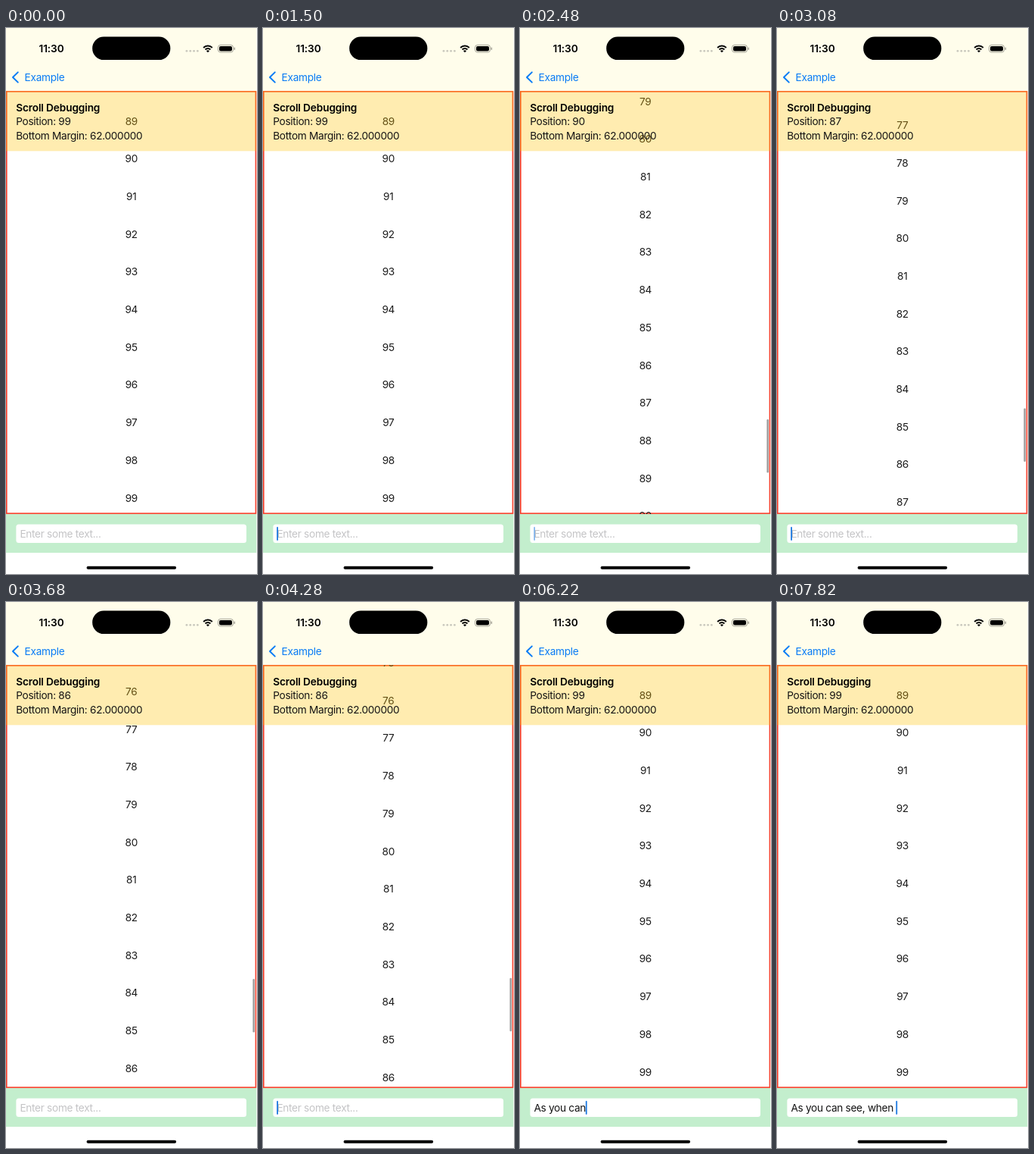
An HTML page that plays this animation: 332x720 px, repeating every 8 s.

```html
<!DOCTYPE html>
<html lang="en">
<head>
<meta charset="utf-8">
<title>Scroll debugging</title>
<style>
  html, body { margin: 0; width: 100%; height: 100%; overflow: hidden; background: #fff; }
  svg { display: block; width: 332px; height: 720px; }
  text { font: 13.7px Inter, "Open Sans", sans-serif; letter-spacing: -.32px; white-space: pre; fill: #141414; }
  .bold { font-weight: 600; letter-spacing: -.15px; fill: #000; }
  #rows text { text-anchor: middle; fill: #1c1c1c; }
</style>
</head>
<body>
<svg viewBox="0 0 332 720">
  <clipPath id="viewport"><rect y="83" width="331.2" height="558"/></clipPath>
  <rect width="331.2" height="83" fill="#fffdeb"/>

  <!-- status bar -->
  <text class="bold" x="43.6" y="32">11:30</text>
  <rect x="114.2" y="11.6" width="103.2" height="30.5" rx="15.2"/>
  <g fill="#c9c8bd">
    <circle cx="239" cy="30.3" r="1.4"/><circle cx="243.8" cy="30.3" r="1.4"/>
    <circle cx="248.6" cy="30.3" r="1.4"/><circle cx="253.4" cy="30.3" r="1.4"/>
  </g>
  <g fill="none" stroke="#000" stroke-width="2">
    <path d="M261.2 26a8.2 8.2 0 0 1 11.6 0M263.6 28.5a4.8 4.8 0 0 1 6.8 0"/>
  </g>
  <path d="M267 32.3l-2-2.1a2.9 2.9 0 0 1 4 0z"/>
  <rect x="280.5" y="22.4" width="20" height="9.6" rx="3.2" fill="none" stroke="#000" stroke-opacity=".35"/>
  <rect x="282" y="23.9" width="17" height="6.6" rx="2"/>
  <rect x="301.7" y="25.5" width="1.3" height="3.4" rx=".6" opacity=".4"/>

  <!-- navigation -->
  <path d="M15.8 58.4L9 65l6.8 6.6" fill="none" stroke="#0a7cf5" stroke-width="2" stroke-linecap="round" stroke-linejoin="round"/>
  <text x="24.6" y="70" style="fill:#0a7cf5">Example</text>

  <!-- list -->
  <rect x=".8" y="83.8" width="329.6" height="556.3" fill="none" stroke="#f8432f" stroke-width="1.65"/>
  <g clip-path="url(#viewport)">
    <g id="rows"></g>
    <rect id="indicator" x="326.4" width="2.5" height="70.5" rx="1.25" fill="#000" fill-opacity=".38"/>
  </g>
  <rect y="83" width="331.2" height="79.3" fill="#ffc300" fill-opacity=".31"/>
  <text class="bold" x="13.2" y="109.5">Scroll Debugging</text>
  <text id="position" x="13.2" y="128"></text>
  <text x="13.2" y="146.5">Bottom Margin: 62.000000</text>

  <!-- input -->
  <rect y="641" width="331.2" height="51" fill="#c3eecd"/>
  <rect x="13.4" y="654.6" width="304.6" height="24.4" rx="3.5" fill="#fff"/>
  <text id="placeholder" x="18.4" y="671.5" style="fill:#c4c4c6">Enter some text...</text>
  <text id="typed" x="18.4" y="671.5"></text>
  <rect id="caret" y="657.8" width="1.8" height="18" rx=".9" fill="#1b78e0"/>

  <rect x="106.6" y="709.7" width="118.6" height="4.1" rx="2.05"/>
</svg>
<script>
const LOOP = 8000, ROW_GAP = 49.7, LAST_ROW = 99, LAST_BASELINE = 624.5;
const TYPING_START = 5090, MESSAGE = "As you can see, when ";
const $ = id => document.getElementById(id);
const clamp = x => Math.min(1, Math.max(0, x));

for (let n = 60; n <= LAST_ROW; n++) {
  const row = document.createElementNS("http://www.w3.org/2000/svg", "text");
  row.setAttribute("x", 165.8);
  row.setAttribute("y", LAST_BASELINE - (LAST_ROW - n) * ROW_GAP);
  row.textContent = n;
  $("rows").append(row);
}

// The screen refreshes every 200 ms while something moves, with a few pauses.
const refreshes = [0, 100, 1500];
for (const [from, to] of [[1580, 2380], [2480, 4680], [4750, 4750], [5090, 6090], [6220, 6220], [6490, 7690], [7820, 7820]])
  for (let t = from; t <= to; t += 200) refreshes.push(t);

// Distance from the bottom of the list: flick, exponential slow-down, return on typing.
function scrollAt(t) {
  if (t < 1685) return 0;
  if (t < 1980) return 150 * ((t - 1685) / 295) ** 2;
  const coast = 658.5 - 187.4 * Math.exp((2480 - t) / 500);
  const back = clamp((t - 4886) / 300);
  return coast * (1 + Math.cos(Math.PI * back)) / 2;
}

function caretOpacity(t) {
  if (t < 1500) return 0;
  if (t < 2400 || t >= TYPING_START) return 1;
  const phase = (t - 2400) % 1000;
  return phase < 450 ? clamp(1 - phase / 170) : clamp((phase - 450) / 150);
}

function typedCount(t) {
  if (t < TYPING_START) return 0;
  return Math.round(t < 6220 ? 1 + 9 * (t - TYPING_START) / 1130 : 10 + 11 * (t - 6220) / 1600);
}

function draw(t) {
  const scroll = scrollAt(t), typing = t >= TYPING_START;
  $("rows").setAttribute("transform", `translate(0 ${scroll})`);
  $("indicator").setAttribute("y", 568.6 - scroll * 0.1116);
  $("indicator").setAttribute("opacity", t < 1685 ? 0 : clamp((5900 - t) / 300));

  const lowest = Math.ceil(LAST_ROW + (44 - scroll) / ROW_GAP) - 1;
  $("position").textContent = "Position: " + (typing ? LAST_ROW : Math.min(LAST_ROW, lowest));

  $("placeholder").setAttribute("opacity", typing ? 0 : 1);
  $("typed").textContent = MESSAGE.slice(0, typedCount(t));
  $("caret").setAttribute("x", 18.2 + (typing ? $("typed").getComputedTextLength() : 0));
  $("caret").setAttribute("opacity", caretOpacity(t));
}

function tick() {
  const t = performance.now() % LOOP;
  draw(refreshes.findLast(start => start <= t));
  requestAnimationFrame(tick);
}
tick();
</script>
</body>
</html>
```
